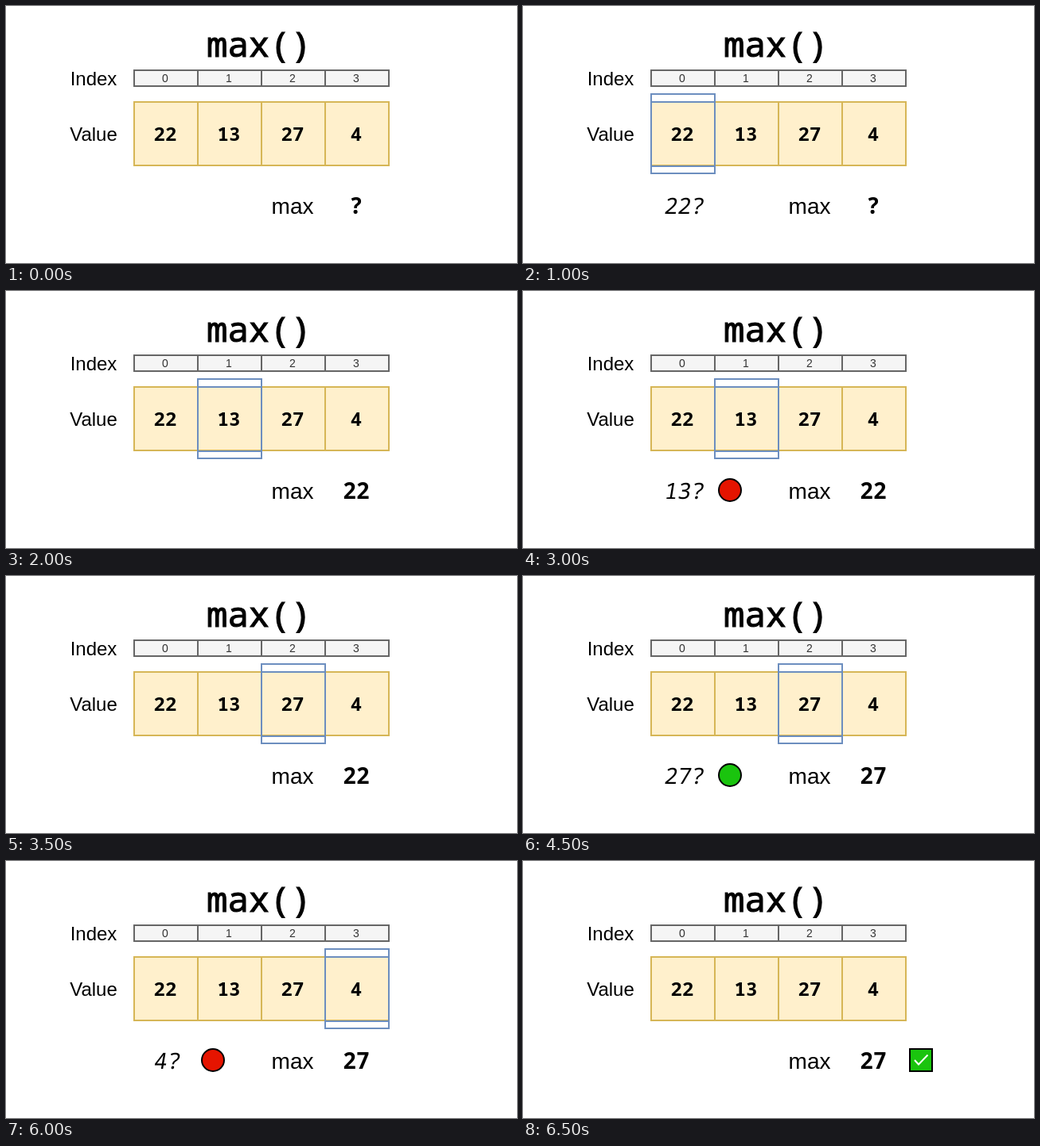
Recreate the animation shown at these times as an HTML page with a canvas. Size 642 px wide and 324 px high, loop 8.5 s.

```html
<!DOCTYPE html>
<html lang="en">
<head>
<meta charset="utf-8">
<title>max()</title>
<style>
  html, body { margin: 0; width: 100%; height: 100%; overflow: hidden; background: #fff; }
  canvas { display: block; width: 642px; height: 324px; }
</style>
</head>
<body>
<canvas id="stage" width="642" height="324"></canvas>
<script>
const ctx = document.getElementById('stage').getContext('2d');
const LOOP = 8500, START = 1000, STEP = 1500, PHASE = 500;
const SANS = '"Liberation Sans", Arial, sans-serif';
const MONO = '"Noto Sans Mono", "DejaVu Sans Mono", monospace';
const GREEN = '#1ac40e', RED = '#e51400', BLUE = '#6c8ebf';
const values = [22, 13, 27, 4];
const CELL = 80, LEFT = 161;

function text(str, x, y, font, color = '#000') {
  ctx.font = font;
  ctx.fillStyle = color;
  ctx.fillText(str, x, y);
}

function box(x, y, w, h, fill, stroke) {
  ctx.lineWidth = 2;
  ctx.strokeStyle = stroke;
  if (fill) {
    ctx.fillStyle = fill;
    ctx.fillRect(x, y, w, h);
  }
  ctx.strokeRect(x, y, w, h);
}

function line(...points) {
  ctx.beginPath();
  points.forEach(([x, y]) => ctx.lineTo(x, y));
  ctx.stroke();
}

function drawTitle() {
  text('max()', 318, 64, `44px ${MONO}`);
  // Thicken the regular weight slightly
  ctx.lineWidth = 1.1;
  ctx.strokeStyle = '#000';
  ctx.strokeText('max()', 318, 64);
}

function drawArray() {
  text('Index', 110, 100, `24px ${SANS}`);
  text('Value', 110, 170, `24px ${SANS}`);
  values.forEach((value, i) => {
    const x = LEFT + i * CELL;
    box(x, 81, CELL, 20, '#f5f5f5', '#666');
    box(x, 121, CELL, CELL, '#fff0cc', '#d6b656');
    text(i, x + 39, 96, `14px ${SANS}`, '#333');
    text(value, x + 39, 170, `bold 24px ${MONO}`);
  });
}

function drawCursor(i) {
  const x = LEFT + i * CELL;
  box(x, 111, CELL, 100, null, BLUE);
  line([x, 121], [x + CELL, 121]);
  line([x, 202], [x + CELL, 202]);
}

function drawQuestion(value) {
  ctx.save();
  ctx.translate(200, 262);
  ctx.transform(1, 0, -0.16, 1, 1.6, 0);
  text(value + '?', 0, 0, `28px ${MONO}`);
  ctx.restore();
}

function drawLamp(color) {
  ctx.beginPath();
  ctx.arc(260, 251, 14, 0, Math.PI * 2);
  ctx.fillStyle = color;
  ctx.fill();
  ctx.lineWidth = 2;
  ctx.strokeStyle = '#000';
  ctx.stroke();
}

function drawDone() {
  box(486, 237, 28, 28, GREEN, '#000');
  ctx.strokeStyle = '#fff';
  line([492, 251], [497, 256.5], [508.5, 244.5]);
}

function draw(t) {
  ctx.fillStyle = '#fff';
  ctx.fillRect(0, 0, 642, 324);
  ctx.textAlign = 'center';
  drawTitle();
  drawArray();

  // The first cell has no empty phase, so its clock starts one phase earlier
  const clock = t - START + PHASE;
  const i = t < START ? -1 : Math.floor(clock / STEP);
  const phase = Math.floor((clock % STEP) / PHASE);
  const running = i >= 0 && i < values.length;

  let best = -Infinity;
  values.slice(0, Math.max(i, 0)).forEach(v => { best = Math.max(best, v); });

  if (running) {
    const value = values[i];
    drawCursor(i);
    if (phase >= 1) drawQuestion(value);
    if (phase === 2) {
      drawLamp(value > best ? GREEN : RED);
      best = Math.max(best, value);
    }
  }

  text('max', 360, 262, `28px ${SANS}`);
  text(best === -Infinity ? '?' : best, 440, 262, `bold 28px ${MONO}`);
  if (i >= values.length) drawDone();
}

const origin = performance.now();
function tick() {
  draw((performance.now() - origin) % LOOP);
  requestAnimationFrame(tick);
}
tick();
</script>
</body>
</html>
```
